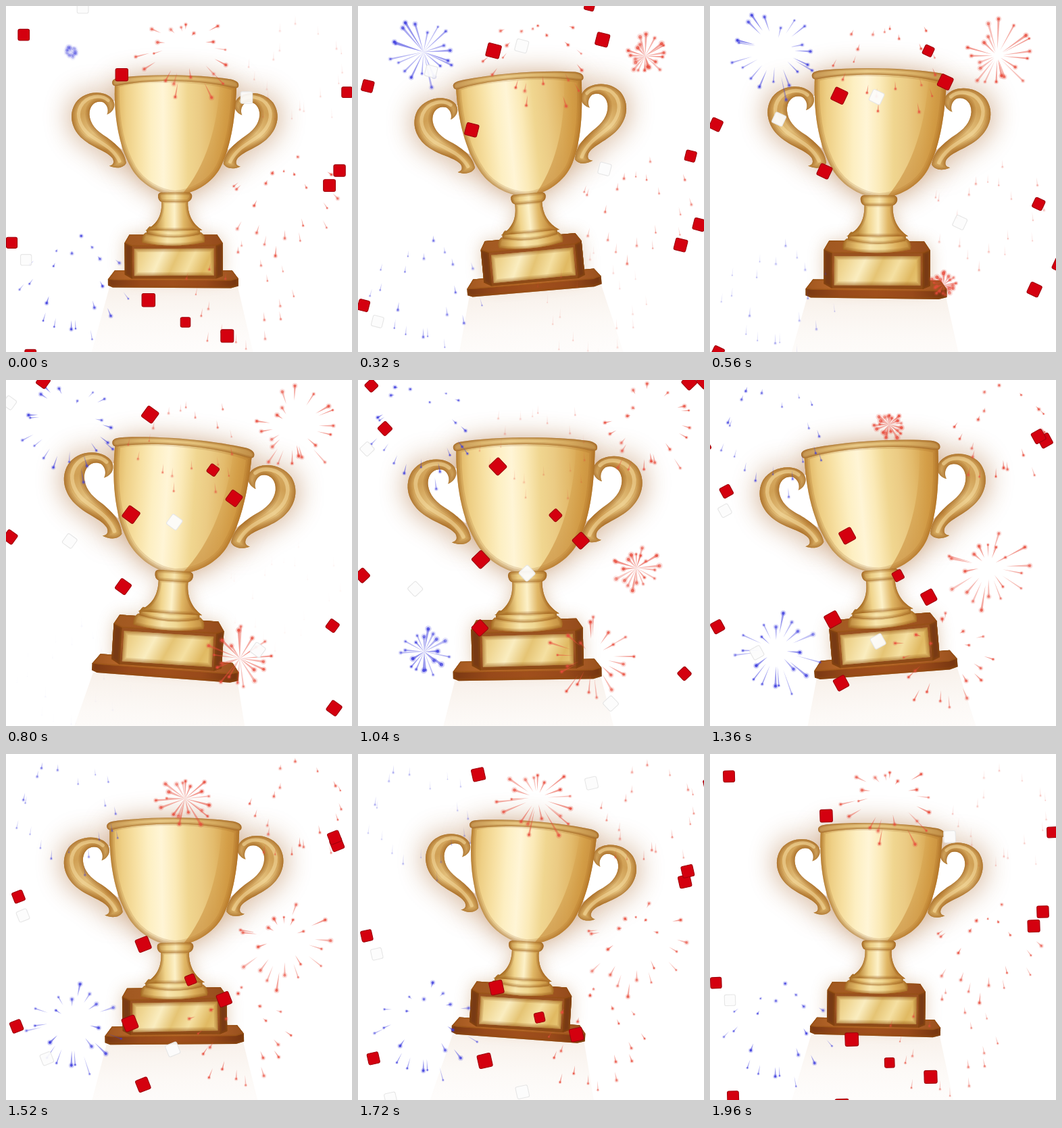
Recreate the animation shown at these times as an HTML page with a canvas. Size 512 by 512 pixels, loop 2 s.

```html
<!DOCTYPE html>
<html lang="en">
<head>
<meta charset="utf-8">
<title>Trophy</title>
<style>
html, body { margin: 0; height: 100%; overflow: hidden; background: #fff; }
canvas { display: block; width: 100vw; height: 100vh; }
</style>
</head>
<body>
<canvas id="stage" width="512" height="512"></canvas>
<script>
const c = document.getElementById('stage').getContext('2d');
const LOOP = 2000, STEP = 40, TAU = Math.PI * 2, DEG = Math.PI / 180;

const path = d => new Path2D(d);
const cup = path('M162 114C160 160 166 205 186 240C200 264 228 279 250 280C276 279 304 264 317 240C335 205 340 160 342 120C300 104 200 102 162 114Z');
const shade = path('M318 108C314 180 296 240 256 284H350V108Z');
const rim = path('M158 112C159 107 165 106 174 105C225 100 290 102 334 109C342 111 346 114 345 119C344 123 340 122 335 121C285 109 215 108 168 117C161 119 158 117 158 112Z');
const handle = path('M150 160C159 157 166 146 157 136C146 124 118 124 104 142C92 160 98 182 114 196C130 210 150 214 158 225C161 231 159 235 153 236C164 241 174 239 178 232C176 214 162 203 150 194C134 184 125 174 124 160C124 145 135 138 145 142C151 146 153 154 150 160Z');
const handleRidge = path('M152 139C142 130 120 131 111 148C104 162 110 178 124 190C140 202 158 208 168 229');
const handleHole = path('M140 141C118 140 118 176 146 192L172 212L164 140Z');
const stem = path('M230 288C231 308 225 322 206 332L290 332C275 322 268 308 269 288Z');
const ring = path('M229 276H271Q276 278 275 283T269 290H231Q226 289 225 283T229 276Z');
const foot1 = path('M212 326Q247 334 282 327Q289 331 286 338Q247 347 208 337Q206 331 212 326Z');
const foot2 = path('M206 335Q247 344 288 335Q296 341 293 350Q247 359 201 350Q199 340 206 335Z');
const plate = path('M160 391L334 392L343 404V415L332 418L157 416L150 413V404Z');
const plateTop = path('M160 391L334 392L343 404L332 407L158 405L150 404Z');
const box = path('M182 338L312 339L320 351V400L310 404L185 403L175 397V350Z');
const boxTop = path('M182 338L312 339L320 351L310 355L186 355L175 350Z');
const boxSide = path('M175 350L186 355V403L175 397ZM310 355L320 351V400L310 404Z');
const plaque = path('M189 359H307V399H189Z');
const beam = path('M152 416H342L368 530H120Z');

// Evenly spaced colours
function ramp(x0, y0, x1, y1, colors) {
  const g = c.createLinearGradient(x0, y0, x1, y1);
  colors.split(' ').forEach((k, i, all) => g.addColorStop(i / (all.length - 1), k));
  return g;
}

// Fill with a soft brown inner edge
function solid(shape, fill, edge) {
  c.save();
  c.fillStyle = fill;
  c.fill(shape);
  c.clip(shape);
  c.strokeStyle = 'rgba(140,78,12,.17)';
  for (const w of [edge * 2, edge * 1.3, edge * .7, 1.5]) {
    c.lineWidth = w;
    c.stroke(shape);
  }
  c.restore();
}

function mirrored(draw) {
  draw();
  c.save();
  c.translate(500, 2);
  c.scale(-1, 1);
  draw();
  c.restore();
}

function drawHandle() {
  solid(handle, ramp(98, 130, 170, 238, '#dcb26a #d0a055 #e2be7a #cc984c #deb66c'), 6);
  c.strokeStyle = 'rgba(250,226,165,.5)';
  c.lineWidth = 5;
  c.lineCap = 'round';
  c.stroke(handleRidge);
}

function drawGlow() {
  c.save();
  c.shadowColor = 'rgba(165,95,35,.65)';
  c.shadowBlur = 42;
  c.fillStyle = '#d0a55a';
  mirrored(() => c.fill(handle));
  c.fill(cup);
  c.shadowColor = 'rgba(176,112,48,.35)';
  c.shadowBlur = 24;
  c.fill(stem);
  c.fill(box);
  c.shadowColor = 'transparent';
  c.fillStyle = '#fff';
  mirrored(() => c.fill(handleHole));
  c.restore();
}

function drawTrophy(t) {
  const wave = Math.cos(TAU * t / LOOP), s = 1.07 - .07 * wave;
  const tilt = -4.7 * Math.sin(TAU * (t - 22) / 1000) - 1;
  c.save();
  c.translate(249, 264.5 - 2.5 * wave);
  c.rotate(tilt * DEG);
  c.scale(s, s);
  c.translate(-249, -262);

  c.fillStyle = ramp(0, 416, 0, 520, 'rgba(228,200,175,.26) rgba(242,226,212,.2) rgba(248,236,230,.12)');
  c.fill(beam);
  drawGlow();
  mirrored(drawHandle);

  solid(plate, ramp(150, 0, 343, 0, '#7a3812 #98491a #a04f1c #98491a #74340f'), 4);
  solid(plateTop, ramp(150, 0, 343, 0, '#a0561f #bb6a2c #be6d2e #b3622a #98501d'), 2);
  solid(box, ramp(0, 350, 0, 404, '#97501e #a05624 #8c481c'), 5);
  solid(boxSide, '#783a14', 3);
  solid(boxTop, ramp(175, 0, 320, 0, '#a05820 #ad6028 #944a1b'), 2);
  solid(plaque, ramp(189, 352, 307, 408, '#e3bf70 #f0d794 #faedc0 #e5c474 #f5e0a2 #e0b962 #eccd80'), 5);

  solid(foot2, ramp(201, 0, 294, 0, '#b88238 #e3bd6c #f8e6ae #f0d894 #dcae5a #c08a3c'), 4);
  solid(foot1, ramp(208, 0, 287, 0, '#b88238 #e3bd6c #f8e6ae #f0d894 #dcae5a #c08a3c'), 4);
  solid(stem, ramp(222, 0, 276, 0, '#c08e3e #f0d48c #fdf1c8 #e0b766 #c48c3e'), 4);

  c.save();
  solid(cup, ramp(160, 0, 343, 0, '#dcae58 #eecf85 #f7e0a2 #fdefc2 #fff5d6 #fbeab8 #f0d690 #ebcb84 #e3bb6c #d6a24c #c68c3c'), 7);
  c.clip(cup);
  c.fillStyle = ramp(280, 110, 290, 280, 'rgba(205,145,55,.08) rgba(198,134,45,.32) rgba(186,116,34,.52)');
  c.fill(shade);
  c.restore();

  solid(ring, ramp(225, 0, 276, 0, '#bc883c #ecce84 #f9e7b0 #dcb05c #b98238'), 4);
  solid(rim, ramp(158, 0, 345, 0, '#c49350 #dcb66e #e8c987 #e2bf78 #d6ab60 #c08d46'), 3);
  c.restore();
}

const rand = n => {
  const v = Math.sin(n * 127.1 + 11.7) * 43758.5453;
  return v - Math.floor(v);
};

// Fireworks: x, y, start time
const blueBursts = [[97, 68, 1960], [98, 402, 820]];
const redBursts = [[265, 66, 1240], [425, 74, 130], [412, 278, 830], [346, 412, 460]];
const RAYS = 20;

function drawBurst([x, y, start], rgb, t) {
  const age = (t - start + LOOP) % LOOP;
  const fade = Math.min(1, age / 120, (LOOP - age) / 700);
  for (let i = 0; i < RAYS; i++) {
    const seed = start + i;
    const angle = (i + rand(seed)) / RAYS * TAU;
    const reach = 40 + 50 * rand(seed + 400);
    const at = a => {
      const r = reach * (1 - Math.exp(-a / 400));
      return [x + r * Math.cos(angle), y + r * Math.sin(angle) + a * a * 1.1e-5];
    };
    const [hx, hy] = at(age), [bx, by] = at(Math.max(0, age - 380));
    const len = Math.hypot(hx - bx, hy - by) || 1;
    const size = (1.6 + rand(seed + 800) * 1.5) * (1 - age / 3600);
    const nx = (hy - by) / len * size * .7, ny = (bx - hx) / len * size * .7;
    const alpha = fade * (.55 + .45 * rand(seed + 900));
    c.fillStyle = `rgba(${rgb},${alpha * .55})`;
    c.beginPath();
    c.moveTo(bx, by);
    c.lineTo(hx + nx, hy + ny);
    c.lineTo(hx - nx, hy - ny);
    c.fill();
    for (const [r, k] of [[size * 1.7, .25], [size * .9, .85]]) {
      c.fillStyle = `rgba(${rgb},${alpha * k})`;
      c.beginPath();
      c.arc(hx, hy, r, 0, TAU);
      c.fill();
    }
  }
}

// Confetti, largest first: time and x at mid-height, fall speed, drift
const reds = [
  [1005, 182, .277, -.01], [1440, 203, .32, 0], [1110, 328, .261, -.023],
  [605, 170, .255, .013], [1965, 479, .275, -.013], [50, 495, .25, .03],
  [900, 6, .237, 0], [1675, 14, .29, -.025], [435, 489, .295, -.025],
  [1925, -44, .28, -.05], [1240, 283, .279, -.042], [1740, 526, .26, -.02]
];
const whites = [
  [945, 250, .315, .003], [365, 366, .33, .022], [860, 92, .295, -.038], [1580, 26, .285, .015]
];
const redLook = { bow: 2.5e-5, size: 20, shrink: .55, fill: '#d4000f', edge: '#a0000c' };
const whiteLook = { bow: -1.5e-5, size: 18, shrink: .6, fill: 'rgba(252,252,252,.92)', edge: '#e6e6e6' };

function drawPiece([mid, x, fall, drift], look, index, t) {
  const size = look.size - index * look.shrink, h = size / 2;
  c.fillStyle = look.fill;
  c.strokeStyle = look.edge;
  c.lineWidth = 1.1;
  for (const dt of [t - mid - LOOP, t - mid, t - mid + LOOP]) {
    c.save();
    c.translate(x + drift * dt + look.bow * dt * dt, 256 + fall * dt);
    c.rotate(t / LOOP * TAU / 4);
    c.beginPath();
    c.roundRect(-h, -h, size, size, 2.5);
    c.fill();
    c.stroke();
    c.restore();
  }
}

function frame(now) {
  const t = Math.floor(now % LOOP / STEP) * STEP;
  c.fillStyle = '#fff';
  c.fillRect(0, 0, 512, 512);
  drawTrophy(t);
  blueBursts.forEach(b => drawBurst(b, '58,58,222', t));
  redBursts.forEach(b => drawBurst(b, '232,76,60', t));
  whites.forEach((p, i) => drawPiece(p, whiteLook, i, t));
  reds.forEach((p, i) => drawPiece(p, redLook, i, t));
  requestAnimationFrame(frame);
}
frame(0);
</script>
</body>
</html>
```
